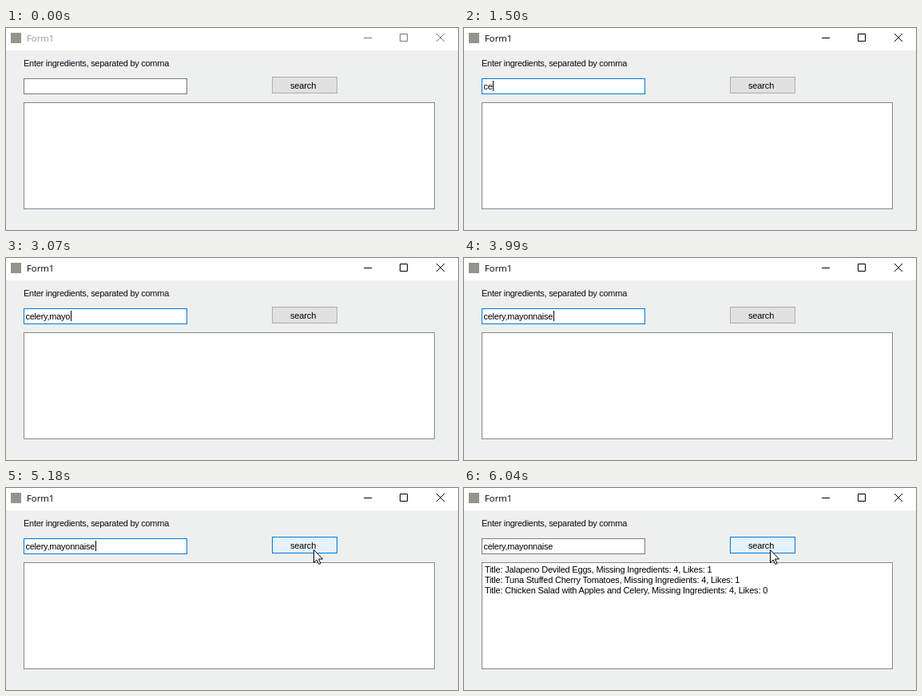
These frames come from a looping animation (566x253 px, 8000 ms). An HTML page:

```html
<!DOCTYPE html>
<html lang="en">
<head>
<meta charset="utf-8">
<title>Form1</title>
<style>
  html, body { margin: 0; width: 100%; height: 100%; overflow: hidden; background: #eef0ef; }
  svg { display: block; width: 566px; height: 253px; }
  text { font: 11px "Liberation Sans", Arial, sans-serif; letter-spacing: -.25px; white-space: pre; }
  #title { font: 11.3px "Open Sans", "Noto Sans", sans-serif; letter-spacing: 0; }
  #list text { letter-spacing: -.19px; }
  #controls { fill: none; }
</style>
</head>
<body>
<svg viewBox="0 0 566 253">
  <rect width="566" height="253" fill="#eef0ef"/>
  <rect width="566" height="28" fill="#fff"/>
  <rect x="6" y="6" width="13" height="13" fill="#96938a"/>
  <text id="title" x="26" y="17">Form1</text>
  <path id="controls" d="M448 12.5h10M493.5 7.5h9v9h-9zM539 7l10 10m0-10l-10 10"/>

  <text x="22" y="48" fill="#100818" style="letter-spacing:-.27px">Enter ingredients, separated by comma</text>

  <rect id="field" x="22.5" y="63.5" width="204" height="19" fill="#fff"/>
  <text id="entry" x="24.5" y="77"></text>
  <rect id="caret" y="66" width="1" height="13"/>

  <rect id="button" x="333.5" y="61.5" width="81" height="20"/>
  <text id="label" x="356" y="76" style="letter-spacing:-.15px">search</text>

  <rect x="22.5" y="93.5" width="514" height="133" fill="#fff" stroke="#828790"/>
  <g id="list">
    <text x="26" y="106">Title: Jalapeno Deviled Eggs, Missing Ingredients: 4, Likes: 1</text>
    <text x="26" y="119">Title: Tuna Stuffed Cherry Tomatoes, Missing Ingredients: 4, Likes: 1</text>
    <text x="26" y="132">Title: Chicken Salad with Apples and Celery, Missing Ingredients: 4, Likes: 0</text>
  </g>

  <path id="arrow" d="M.5 .5V16.5L4.2 13L6.8 18.5L9 17.5L6.5 12H11.5Z" fill="#fff" stroke="#000"/>
  <path id="beam" d="M-3 -7.5H0M1 -7.5H4M.5 -7V7M-3 7.5H0M1 7.5H4" fill="none" stroke="#000"/>
</svg>
<script>
const LOOP = 8000;
const PHRASE = "celery,mayonnaise";
const KEY_TIMES = [1240, 1500, 1610, 1710, 1820, 1960, 2150, 2420, 2610, 2740,
                   3070, 3330, 3530, 3660, 3800, 3900, 3990];

// [time, pointer, x, y]
const POINTER = [
  [0, "none", 0, 0],
  [190, "arrow", 203, 223], [260, "arrow", 142, 195], [330, "arrow", 82, 168],
  [390, "arrow", 42, 145], [460, "arrow", 45, 133], [520, "arrow", 50, 118],
  [590, "arrow", 55, 103], [650, "arrow", 59, 88], [720, "beam", 62, 72],
  [780, "beam", 64, 66],
  [1240, "none", 0, 0],
  [4520, "beam", 68, 68], [4590, "arrow", 100, 86], [4650, "arrow", 190, 84],
  [4720, "arrow", 275, 75], [4780, "arrow", 345, 65], [4850, "arrow", 374, 61],
  [4920, "arrow", 378, 65], [4980, "arrow", 381, 70], [5050, "arrow", 383, 74],
  [5110, "arrow", 385, 77], [5710, "arrow", 383, 77]
];

// [time, border]
const FIELD = [[0, "#7a7a7a"], [720, "#2b2b2b"], [1040, "#0078d7"], [5380, "#7a7a7a"]];

// [time, fill, border, text]
const BUTTON = [
  [0, "#e1e1e1", "#adadad", "#000"],
  [4780, "#e5f1fb", "#0078d7", "#000"],
  [5250, "#cce4f7", "#005499", "#000"],
  [5380, "#cccccc", "#bfbfbf", "#838383"],
  [5710, "#e1e1e1", "#adadad", "#000"],
  [6040, "#e5f1fb", "#0078d7", "#000"]
];

const $ = id => document.getElementById(id);
const stateAt = (steps, t) => steps.findLast(step => step[0] <= t);
const show = (id, visible) => $(id).setAttribute("visibility", visible ? "visible" : "hidden");
const paint = (id, attrs) => {
  for (const name in attrs) $(id).setAttribute(name, attrs[name]);
};

function draw(t) {
  const active = t >= 980;
  paint("title", { fill: active ? "#000" : "#999" });
  paint("controls", { stroke: active ? "#000" : "#73738c" });

  paint("field", { stroke: stateAt(FIELD, t)[1] });
  const typed = PHRASE.slice(0, KEY_TIMES.filter(time => time <= t).length);
  const entry = $("entry");
  if (entry.textContent !== typed) entry.textContent = typed;
  const width = typed ? entry.getComputedTextLength() : 0;
  paint("caret", { x: Math.round(25.2 + width) });
  show("caret", t >= 1040 && t < 5380);

  const [, fill, stroke, ink] = stateAt(BUTTON, t);
  paint("button", { fill, stroke });
  paint("label", { fill: ink });
  show("list", t >= 5710);

  const [, pointer, x, y] = stateAt(POINTER, t);
  for (const id of ["arrow", "beam"]) {
    show(id, id === pointer);
    paint(id, { transform: `translate(${x} ${y})` });
  }
}

function tick() {
  draw(performance.now() % LOOP);
  requestAnimationFrame(tick);
}
tick();
</script>
</body>
</html>
```
